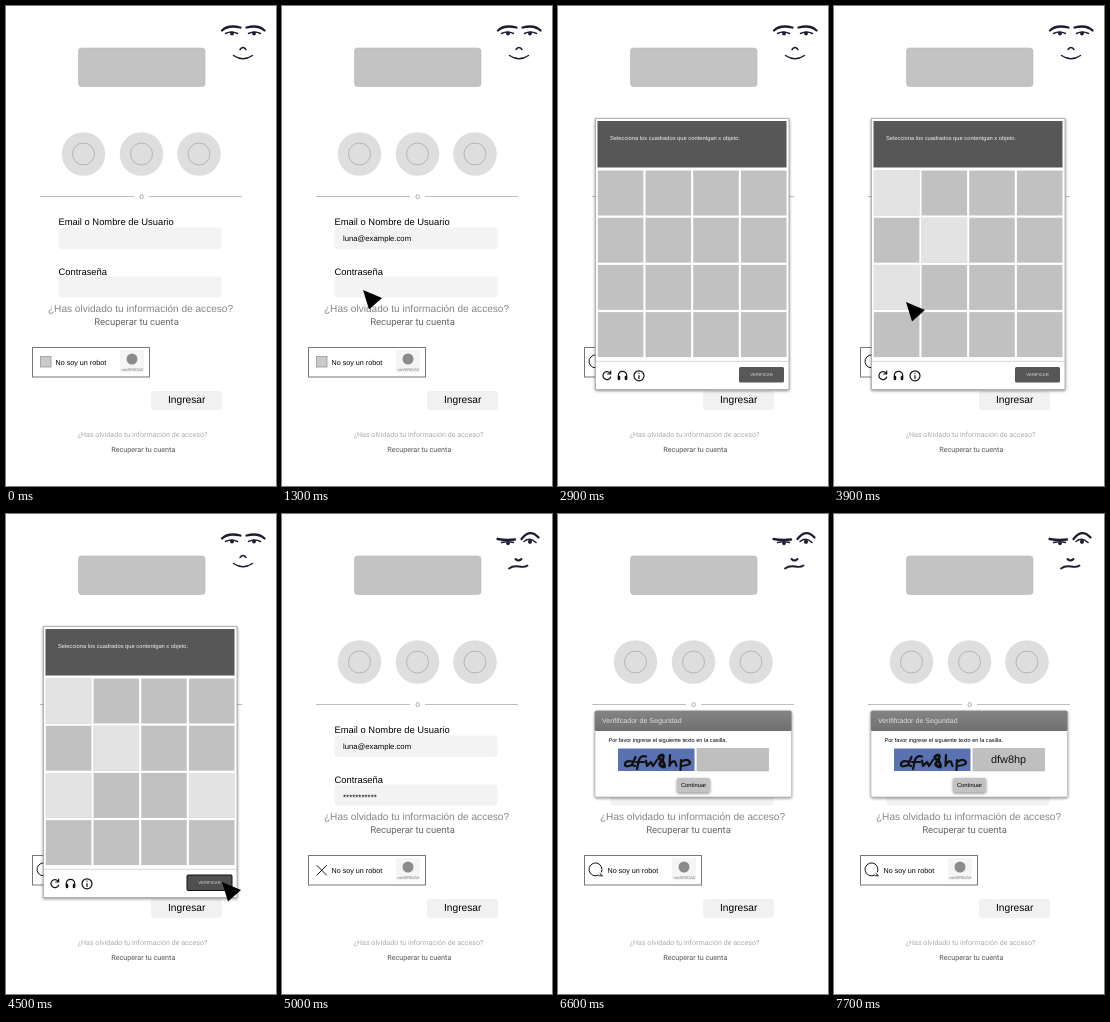
Recreate the animation shown at these times as an HTML page. Size 270x480 px, loop 8000 ms.

```html
<!DOCTYPE html>
<html lang="es">
<head>
<meta charset="utf-8">
<title>Inicio de sesión</title>
<style>
html, body { margin: 0; width: 100%; height: 100%; overflow: hidden; background: #fff; }
svg { display: block; width: 100vw; height: 100vh; font-family: "Liberation Sans", Arial, sans-serif; text-rendering: geometricPrecision; }
.alt { font-family: Roboto, sans-serif; }
.mid { text-anchor: middle; }
.line { fill: none; stroke: #111; stroke-linecap: round; stroke-linejoin: round; }
.face { fill: none; stroke: #1c1d33; stroke-width: 1.5; stroke-linecap: round; }
.face circle { fill: #1c1d33; stroke: none; }
.brow { stroke-width: 2.3; }
.shadow { filter: drop-shadow(0 1.5px 1.5px #0007); }
</style>
</head>
<body>
<svg viewBox="0 0 270 480">
  <defs>
    <linearGradient id="bar" x2="0" y2="1">
      <stop stop-color="#848484"/><stop offset="1" stop-color="#707070"/>
    </linearGradient>
  </defs>

  <rect x="72.500" y="42" width="126.500" height="38.500" rx="3" fill="#c3c3c3" stroke="#b8b8b8" stroke-width=".6"/>

  <g class="face" data-on="0-5000">
    <path class="brow" d="M216 24.500Q222 18.500 234.500 21.500M240.500 21.500Q252.500 18.500 258.500 24.500"/>
    <path d="M219.500 27.500Q225.500 24.500 231.500 27.500M242.500 27.500Q248.500 24.500 254.500 27.500"/>
    <circle cx="226" cy="27.500" r="1.900"/><circle cx="248" cy="27.500" r="1.900"/>
    <path d="M234 43.500Q237 39.500 240 43.500M227.500 49.500Q237 56 246.500 49.500"/>
  </g>
  <g class="face" data-on="5000-8000">
    <path class="brow" d="M215.500 25Q224 26.500 233 25.500M239.500 25Q248 14 256.500 23.500"/>
    <path d="M219.500 28.500Q226 27 231.500 28.500M242 27.500Q248 22.500 254 28.500"/>
    <circle cx="226" cy="29.500" r="1.800"/><circle cx="248" cy="27.800" r="2.100"/>
    <path d="M233.500 45Q236.500 48 239.500 45" stroke-width="2"/>
    <path d="M227 54.500Q231 51.500 237 52.500T245.500 51.500" stroke-width="1.800"/>
  </g>

  <g fill="#dedede" stroke="#aaa" stroke-width=".8">
    <g stroke="none"><circle cx="77.500" cy="148" r="21.800"/><circle cx="135.500" cy="148" r="21.800"/><circle cx="193" cy="148" r="21.800"/></g>
    <circle cx="77.500" cy="148" r="11"/><circle cx="135.500" cy="148" r="11"/><circle cx="193" cy="148" r="11"/>
  </g>

  <path d="M34 190.500H128M143 190.500H236" stroke="#bdbdbd"/>
  <text class="mid" x="135.500" y="192.500" font-size="8.500" fill="#999">o</text>

  <g fill="#f3f3f3">
    <rect x="52.500" y="221.500" width="163" height="21.500" rx="3"/>
    <rect x="52.500" y="270.500" width="163" height="21" rx="3"/>
  </g>
  <text x="52.500" y="218.700" font-size="9.400">Email o Nombre de Usuario</text>
  <text x="52.500" y="268.700" font-size="9.400">Contraseña</text>
  <text x="61" y="235.300" font-size="7.700" data-on="1300-8000">luna@example.com</text>
  <text x="61" y="285.800" font-size="7.900" data-on="1800-6600">***********</text>
  <text class="mid" x="134.500" y="306" font-size="10.100" fill="#858585">¿Has olvidado tu información de acceso?</text>
  <text class="mid alt" x="130.500" y="318.800" font-size="9.500" fill="#666">Recuperar tu cuenta</text>

  <rect x="26.500" y="341.500" width="117" height="29.500" fill="#fff" stroke="#777"/>
  <rect x="114" y="344" width="24" height="22.500" fill="#f5f5f5"/>
  <circle cx="126" cy="353" r="5.500" fill="#8b8b8b"/>
  <text class="mid" x="126.500" y="364.800" font-size="4" fill="#777">noVERIDAX</text>
  <text x="49.500" y="358.500" font-size="7.200">No soy un robot</text>
  <rect x="34.500" y="350.500" width="10.500" height="10.500" fill="#cacaca" stroke="#a0a0a0" stroke-width=".9" data-on="0-2300 5500-6100"/>
  <path class="line" d="M40.500 361.200A6.500 6.500 0 1 1 43.500 358M42 359.500L44.500 361.800H41.500" data-on="2300-5000 6100-8000"/>
  <path class="line" d="M35 351.500L44.500 361M44.500 351.500L35 361" data-on="5000-5500"/>

  <rect x="145" y="385" width="71" height="19" rx="3" fill="#f1f1f1"/>
  <text class="mid" x="180.700" y="397.200" font-size="10.200">Ingresar</text>
  <text class="mid alt" x="136.500" y="431.300" font-size="7.100" fill="#aaa">¿Has olvidado tu información de acceso?</text>
  <text class="mid alt" x="137.300" y="446" font-size="7.200" fill="#555">Recuperar tu cuenta</text>

  <g data-on="2900-5000">
    <rect class="shadow" x="37.500" y="112.500" width="193.500" height="271" fill="#fff" stroke="#aaa" stroke-width=".8"/>
    <rect x="39.500" y="115" width="189" height="46.500" fill="#575757"/>
    <text x="52" y="133.700" font-size="5.750" fill="#eee">Selecciona los cuadrados que contentgan x objeto.</text>
    <g id="tiles"></g>
    <path d="M38 355.300H231" stroke="#ccc" stroke-width=".8"/>
    <g class="line" stroke-width="1.200">
      <path d="M52 367A4 4 0 1 0 52.700 371M52.700 365V368H49.700"/>
      <path d="M60.300 371V369.500A4.200 4.200 0 0 1 68.700 369.500V371"/>
      <path d="M61 371V373M68 371V373" stroke-width="2.600"/>
      <circle cx="81" cy="369.800" r="5"/>
      <path d="M81 369.500V372.500M81 367.200V367.300"/>
    </g>
    <rect x="181" y="361" width="45" height="15.500" rx="1.500" fill="#575757"/>
    <rect x="181" y="361" width="45" height="15.500" rx="1" fill="#505050" stroke="#111" data-on="4500-5000"/>
    <text class="mid" x="203.500" y="370.300" font-size="4.200" fill="#ddd">VERIFICAR</text>
  </g>

  <g data-on="6600-8000">
    <rect class="shadow" x="37" y="197" width="196.500" height="86" rx="1.500" fill="#fff" stroke="#bbb" stroke-width=".7"/>
    <rect x="36.800" y="196.800" width="196.700" height="20.200" rx="1.500" fill="url(#bar)"/>
    <text x="44" y="209.300" font-size="7.100" fill="#ddd">Verififcador de Seguridad</text>
    <text x="50.500" y="228" font-size="5.600">Por favor ingrese el siguiente texto en la casilla.</text>
    <rect x="60" y="234.500" width="76.500" height="22.500" fill="#5b72b2"/>
    <g class="line" stroke-width="2.200">
      <path d="M74 247.500Q68 246 67 250T74 251L77.500 243M74 251L77 252"/>
      <path d="M88 242.500Q83 241 81 246L79 255M78 248H86"/>
      <path d="M88 246.500L89 252L93 248L95 252L99 246"/>
      <path d="M104.500 246.500Q98 244 102.500 241.500T104.500 246.500Q99 250 104 252.500T104.500 246.500" stroke-width="2.800"/>
      <path d="M112 241L111.500 252Q113 246.500 117 247.500L118.500 252"/>
      <path d="M123 246L122.500 256M123 248Q129 244 131.500 247.500T123 252"/>
    </g>
    <rect x="139" y="234.500" width="71.500" height="22.500" fill="#bfbfbf" stroke="#b0b0b0" stroke-width=".6"/>
    <text x="157" y="248.700" font-size="10.900" fill="#111" data-on="7700-8000">dfw8hp</text>
    <rect class="shadow" x="119" y="264" width="33" height="14.500" rx="2" fill="#c2c2c2"/>
    <text class="mid" x="135.500" y="273.300" font-size="5.800">Continuar</text>
  </g>

  <path id="cursor" d="M0 0L19 8L6 19.500Z" fill="#000"/>
</svg>
<script>
const LOOP = 8000;
// start, end, x, y of each click
const clicks = [
  [700, 1300, 77, 234], [1300, 1800, 81, 284], [1800, 2300, 40, 358],
  [3400, 3900, 70, 193], [3900, 4500, 72, 296], [4500, 5000, 216, 368],
  [5500, 6100, 40, 358], [7100, 7700, 174, 252]
];
// tile index: time it is selected
const picked = { 0: 3400, 5: 3900, 8: 3900, 11: 4500 };

const tile = (i, fill, on) =>
  `<rect x="${39.8 + i % 4 * 47.7}" y="${164.5 + (i >> 2) * 47.2}" width="45.6" height="45"
    fill="${fill}" ${on ? `data-on="${on}-5000"` : ""}/>`;

let html = "";
for (let i = 0; i < 16; i++) {
  html += tile(i, "#c1c1c1");
  if (picked[i]) html += tile(i, "#e3e3e3", picked[i]);
}
document.getElementById("tiles").innerHTML = html;

const cursor = document.getElementById("cursor");
const timed = [...document.querySelectorAll("[data-on]")].map(el =>
  [el, el.dataset.on.split(" ").map(span => span.split("-").map(Number))]);
const show = (el, on) => el.style.display = on ? "" : "none";

function draw(now) {
  const t = now % LOOP;
  const active = ([from, to]) => t >= from && t < to;
  for (const [el, spans] of timed) show(el, spans.some(active));
  const click = clicks.find(active);
  show(cursor, click);
  if (click) cursor.setAttribute("transform", `translate(${click[2]} ${click[3]})`);
}

const start = performance.now();
function frame() {
  draw(performance.now() - start);
  requestAnimationFrame(frame);
}
frame();
</script>
</body>
</html>
```
